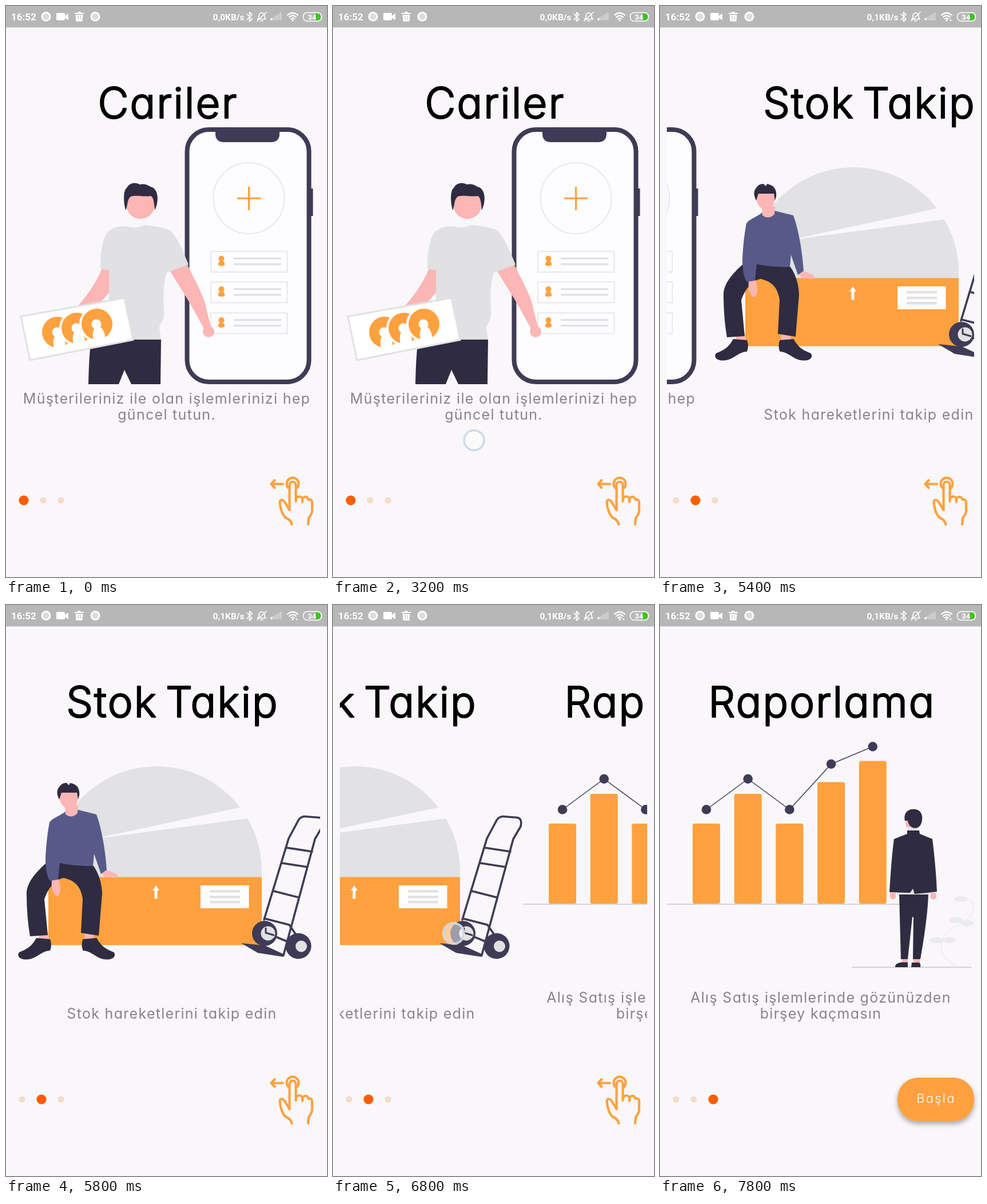
These frames come from a looping animation (561x998 px, 8 s). An HTML page:

```html
<!DOCTYPE html>
<html lang="tr">
<head>
<meta charset="utf-8">
<style>
html, body { margin: 0; width: 100%; height: 100%; overflow: hidden; background: #f9f7fa; }
svg { display: block; width: 100vw; height: 100vh; }
text { font-family: Inter, Lato, sans-serif; font-feature-settings: "cv11"; text-anchor: middle; stroke-linejoin: round; }
.title { font-size: 74px; font-weight: 300; stroke: #000; stroke-width: 2.2; letter-spacing: 2.2px; word-spacing: -9px; }
.note { font-size: 25px; fill: #878489; letter-spacing: 1.3px; }
.status text { font-family: Roboto, sans-serif; font-weight: 600; fill: #fff; text-anchor: start; }
.line { fill: none; stroke-linecap: round; stroke-linejoin: round; }
</style>
</head>
<body>
<svg viewBox="0 0 561 998" preserveAspectRatio="none">
  <defs>
    <clipPath id="window"><rect x="12" y="37" width="537" height="780"/></clipPath>
    <filter id="shadow" x="-20%" y="-20%" width="140%" height="150%">
      <feDropShadow dx="0" dy="5" stdDeviation="4" flood-color="#000" flood-opacity=".32"/>
    </filter>
  </defs>
  <rect width="561" height="998" fill="#f9f7fa"/>
  <g clip-path="url(#window)"><g id="pages"></g></g>
  <g id="dots"></g>
  <g id="swipe" class="line" stroke="#ffa13f" stroke-width="4.2">
    <path d="M484 835.500H464M469.500 829L463.500 835.500L469.500 842"/>
    <path d="M493 842A10.500 10.500 0 1 1 509 842"/>
    <path d="M495.500 881V837A5.500 5.500 0 0 1 506.500 837V866M506.500 861Q512 854 518 860V867M518 861Q525 854 529 863Q535 861 535 868V883Q534 889 529 895L528 906"/>
    <path d="M495.500 881L486.500 866Q480 860 478.500 867Q480 885 488 894Q498 898 499.500 906"/>
  </g>
  <g id="start">
    <rect x="415" y="826" width="134" height="76" rx="36" fill="#ffa13f" filter="url(#shadow)"/>
    <text x="482.500" y="870" font-size="22" font-weight="300" fill="#fff" letter-spacing="2.2">Başla</text>
  </g>
  <g id="touch">
    <circle r="19" fill="none" stroke="#dfe7ef" stroke-width="1.5"/>
    <circle r="17" fill="#fff" fill-opacity=".5" stroke="#c9d6e2" stroke-width="2.500"/>
  </g>
  <g class="status">
    <rect width="561" height="37.500" fill="#b7b7b7"/>
    <text x="9" y="25" font-size="17">16:52</text>
    <g fill="#fff">
      <circle cx="70" cy="18.500" r="8.500"/><circle cx="156" cy="18.500" r="8.500"/>
      <rect x="88" y="12" width="15" height="13" rx="2"/><path d="M102 18L109 13V25L102 20Z"/>
      <path d="M120 12H125L126 10H130L131 12H136V14H120ZM121.500 15.500H134.500L133.500 27H122.500Z"/>
    </g>
    <g fill="#dcdcdc"><circle cx="70" cy="18.500" r="5.500"/><circle cx="156" cy="18.500" r="5.500"/></g>
    <path d="M126 17V24M130 17V24" stroke="#b7b7b7"/>
    <text id="speed" x="361.500" y="24.500" font-size="15.500"></text>
    <g class="line" stroke="#fff" stroke-width="1.700">
      <path d="M421 14L430 23L425.500 27V11L430 15L421 24"/>
      <path d="M440 23H454L452 20V17Q451 12 447 12Q443 12 442 17V20ZM445 26H449M439 26L455 11"/>
      <path d="M492 16Q501 8 510 16M495 19.500Q501 14 507 19.500M498 22.500Q501 20 504 22.500" stroke-width="2.200"/>
      <rect x="519.500" y="11.500" width="32" height="15" rx="7" stroke-width="1.600"/>
    </g>
    <path d="M464 25V21M468 25V19M472 25V16.500M476 25V14M480 25V11.500" stroke="#fff" stroke-width="3" opacity=".38"/>
    <path d="M464 25V21" stroke="#fff" stroke-width="3"/>
    <circle cx="501" cy="25" r="1.700" fill="#fff"/>
    <g id="traffic" fill="#fff"><circle cx="508" cy="25" r="1.400"/></g>
    <path d="M541 13H545Q550 14 550 19Q550 24 545 25H541Z" fill="#3fc51c"/>
    <text x="527" y="24" font-size="13.500">34</text>
  </g>
</svg>
<script>
const ORANGE = "#ffa13f", NAVY = "#3f3b56", DARK = "#2f2b41", SKIN = "#fbb6b5", GREY = "#e2e1e3", PAPER = "#f9f7fa";
const STRIDE = 545, LOOP = 8000;
const $ = id => document.getElementById(id);
const path = (d, fill) => `<path d="${d}" fill="${fill}"/>`;
const line = (d, color, width) => `<path d="${d}" class="line" stroke="${color}" stroke-width="${width}"/>`;
const disc = (x, y, r, fill) => `<circle cx="${x}" cy="${y}" r="${r}" fill="${fill}"/>`;
const box = (x, y, w, h, fill, rest = "") => `<rect x="${x}" y="${y}" width="${w}" height="${h}" fill="${fill}" ${rest}/>`;
const title = (x, s) => `<text class="title" x="${x}" y="196">${s}</text>`;
const note = (x, y, s) => `<text class="note" x="${x}" y="${y}">${s}</text>`;

const card = y => box(358, y, 133.500, 36, "#fdfcfe", `stroke="${GREY}" stroke-width="1.5"`)
  + disc(376.500, y + 12.500, 5, ORANGE)
  + path(`M373 ${y + 17}H380Q383 ${y + 21} 382 ${y + 24}Q376.500 ${y + 27} 371 ${y + 24}Q370 ${y + 21} 373 ${y + 17}Z`, ORANGE)
  + box(398, y + 10.500, 83, 3.500, GREY) + box(398, y + 20.500, 83, 3.500, GREY);

const badge = (x, y) => disc(x, y, 31, "#fff") + disc(x, y, 27, ORANGE) + disc(x - 1, y, 8.500, "#fff")
  + path(`M${x - 5} ${y + 7}L${x + 7} ${y + 5}Q${x + 15} ${y + 15} ${x + 14} ${y + 25}Q${x + 5} ${y + 31} ${x - 6} ${y + 28}Q${x - 9} ${y + 16} ${x - 5} ${y + 7}Z`, "#fff");

const accounts = () => title(283, "Cariler")
  + box(532, 319, 4.500, 48, NAVY)
  + box(316.500, 216, 213, 441, "#fdfcfe", `rx="38" stroke="${NAVY}" stroke-width="8"`)
  + path("M366 216H478V223Q478 238 463 238H381Q366 238 366 223Z", NAVY)
  + `<circle cx="424.5" cy="336" r="62" fill="none" stroke="${GREY}" stroke-width="1.5"/>`
  + box(404, 334.500, 41, 3.200, ORANGE) + box(423, 316, 3.200, 41, ORANGE)
  + [429, 482.500, 536.500].map(card).join("")
  + path("M149 582H271L270 661H219L207 636L197 661H144Q145 610 149 582Z", DARK)
  + path("M168 458L181 460L180 501L160 524H126Q157 488 168 458Z", SKIN)
  + path("M286 462L316 450C328 476 346 505 350 529L358 560L363 569L347 573L345 562L320 517Z", SKIN)
  + disc(354, 569, 10, SKIN)
  + path("M178 395C190 384 204 384 214 386C225 388 233 387 240 383C258 384 275 387 287 392C300 405 310 430 319 452L281 466C277 474 274 500 276 530C278 550 269 555 268 562L271 583H215L180 520V462L165 459C165 435 167 409 178 395Z", "#e1e0e2")
  + disc(235, 347, 25, SKIN)
  + path("M209 357C204 338 206 321 211 318C216 308 228 308 234 312C245 309 250 316 256 317C267 323 267 343 260 357C259 345 258 334 253 332C240 334 230 330 218 333C211 338 213 350 209 357Z", DARK)
  + `<path d="M26 542.500L207 510.500L222 583.500L42 619Z" fill="#fff" stroke="${GREY}" stroke-width="3"/>`
  + badge(90, 570) + badge(124, 563) + badge(159, 556)
  + note(281, 695, "Müşterileriniz ile olan işlemlerinizi hep") + note(281, 723, "güncel tutun.");

const shoe = "M53 582L77 584Q81 594 77 604C62 604 52 620 36 619.500C22 620 19 612 23 607C36 602 45 597 53 582Z";
const stock = () => title(291, "Stok Takip")
  + path("M80.300 476A183.500 183.500 0 1 1 446.700 476Z", GREY)
  + path("M160 407L413 353L427 372.500L160 408Z", PAPER)
  + box(74, 475.500, 373, 119, ORANGE)
  + path("M262 490L268 499H264.500V513.500H259.500V499H256Z", "#fff")
  + box(340, 490, 84.500, 40, "#fff")
  + [498, 508, 517].map(y => box(356, y, 53, 4.500, GREY)).join("")
  + path("M57 572H73L76 588H58ZM138 572H154L153 588H136Z", SKIN)
  + path(shoe, DARK) + `<g transform="matrix(-1 0 0 1 211.500 0)">${path(shoe, DARK)}</g>`
  + path("M69 452C54 466 38 482 36 502Q36 545 42 579L73 577L67 514C74 494 87 479 101 477C118 481 131 490 134 514L131 573L162 578L168 505C168 485 160 465 152 455L92 450Z", DARK)
  + path("M80 481L92 479C97 494 96 508 88 509Q78 501 80 481Z", SKIN)
  + path("M167 469L176 463L193 470Q198 476 190 477L173 475Z", SKIN)
  + path("M104 361C92 370 80 373 76 380C72 400 69 430 69 450Q71 476 77 482L91 480L94 451Q120 457 152 456L154 435L166 470L176 463C174 430 167 390 158 366L126 358Z", "#575a89")
  + path("M103 350H126L125 364Q115 374 104 366Z", SKIN) + path("M92 330Q108 320 126 330Q127 353 110 356Q94 354 92 330Z", SKIN)
  + path("M93 340Q86 326 93 318Q98 310 106 311L110 315L112 311Q130 314 128 333L126 340L124 328H97Z", DARK)
  + line("M451 550L494 408L509 380Q513 370.500 521 369.500L547 371.500Q556 373 553 387L540 409L485 612M489 424L535 431M482 451L527 458M468 500L511 511M452 548L495 559L510 581M455 573L491 588", NAVY, 3.600)
  + path("M411 591L452 595L487 611L485 615L440 608Z", NAVY)
  + disc(452, 574, 22, NAVY) + disc(458, 574, 12.500, GREY) + line("M454 565V573L468 577", NAVY, 3)
  + disc(511, 596, 22.500, NAVY) + disc(516, 596.500, 10, GREY)
  + note(290, 723, "Stok hareketlerini takip edin");

const tops = [382, 330, 382, 309.500, 272.500], marks = [357.500, 304, 357.500, 278, 247.500];
const barX = i => 57 + i * 72.700;
const leaf = ([x, y]) => `<ellipse cx="${x}" cy="${y}" rx="12" ry="5" fill="#ebeaed"/>`;
const reports = () => title(283, "Raporlama")
  + line("M13 523H418M336 633H544", "#c7c6ca", 1.600)
  + tops.map((y, i) => box(barX(i), y, 48, 522 - y, ORANGE, 'rx="3.500"')).join("")
  + line("M" + marks.map((y, i) => `${barX(i) + 24} ${y}`).join("L"), NAVY, 1.500)
  + marks.map((y, i) => disc(barX(i) + 24, y, 8.300, NAVY)).join("")
  + line("M517 631C483 611 487 582 506 568C530 553 554 547 546 520Q540 512 527 514", "#ebeaed", 1.300)
  + [[526, 514], [517, 551], [537, 556], [483, 586], [505, 586]].map(leaf).join("")
  + path("M402 503H412V512Q406 518 402 511ZM473 503H482L483 512Q478 518 473 512ZM423 617H433V627H423ZM443 617H454V627H443Z", SKIN)
  + path("M414 500H469V508H414Z", GREY)
  + path("M418 506H469C468 540 461 585 455 619H442L443 546L441 545L433 619H421Z", DARK)
  + path("M411 633Q411 625 424 624.500H433V633ZM439 633L440 625H453Q456 627 455 633Z", DARK)
  + path("M432 394H453L454 400L476 409C480 440 483 475 484 501L467 503L445 505L442 496L437 503L401 502C403 470 405 438 409 409L432 400Z", DARK)
  + path("M429 374L436 372L438 388H430Z", SKIN) + box(434, 388, 18, 5, GREY)
  + path("M428 377C425 363 434 356 444 357C453 356 460 365 458 376Q456 390 445 390Q435 389 433 377Z", DARK)
  + note(281, 695, "Alış Satış işlemlerinde gözünüzden") + note(281, 723, "birşey kaçmasın");

$("pages").innerHTML = [accounts, stock, reports]
  .map((draw, i) => `<g transform="translate(${i * STRIDE})">${draw()}</g>`).join("");

// Piecewise linear value through [time, value] points
function track(points, t) {
  const next = points.findIndex(p => p[0] > t);
  if (next === 0) return points[0][1];
  if (next < 0) return points.at(-1)[1];
  const [[t0, a], [t1, b]] = [points[next - 1], points[next]];
  return a + (b - a) * (t - t0) / (t1 - t0);
}
const scroll = [[5000, 0], [5200, 190], [5400, 470], [5600, 545],
  [6400, 545], [6600, 625], [6800, 770], [7000, 1025], [7200, 1084], [7300, 1090]];

function touchAt(t, x) {
  if (t >= 3000 && t < 3400) return [246.500, 759];
  if (t >= 5000 && t < 5400) return [456.500 - x, 598.500];
  if (t >= 6400 && t < 7000) return [436 - (x - STRIDE), 574];
}

function render(now) {
  const t = Math.floor(now % LOOP / 200) * 200;
  const x = track(scroll, t), page = Math.round(x / STRIDE), touch = touchAt(t, x);
  $("pages").setAttribute("transform", `translate(${-x})`);
  $("dots").innerHTML = [0, 1, 2].map(i => i === page
    ? disc(31 + i * 31, 864, 8.600, "#ff5c00")
    : disc(28 + i * 31 + (i > page ? 6 : 0), 864, 5.600, "#f3dcc8")).join("");
  $("swipe").style.display = page < 2 ? "" : "none";
  $("start").style.display = page < 2 ? "none" : "";
  $("touch").style.display = touch ? "" : "none";
  if (touch) $("touch").setAttribute("transform", `translate(${touch})`);
  $("speed").textContent = t < 5200 ? "0,0KB/s" : "0,1KB/s";
  $("traffic").style.display = t < 5200 ? "none" : "";
}

const begin = performance.now();
function tick() {
  render(performance.now() - begin);
  requestAnimationFrame(tick);
}
tick();
</script>
</body>
</html>
```
